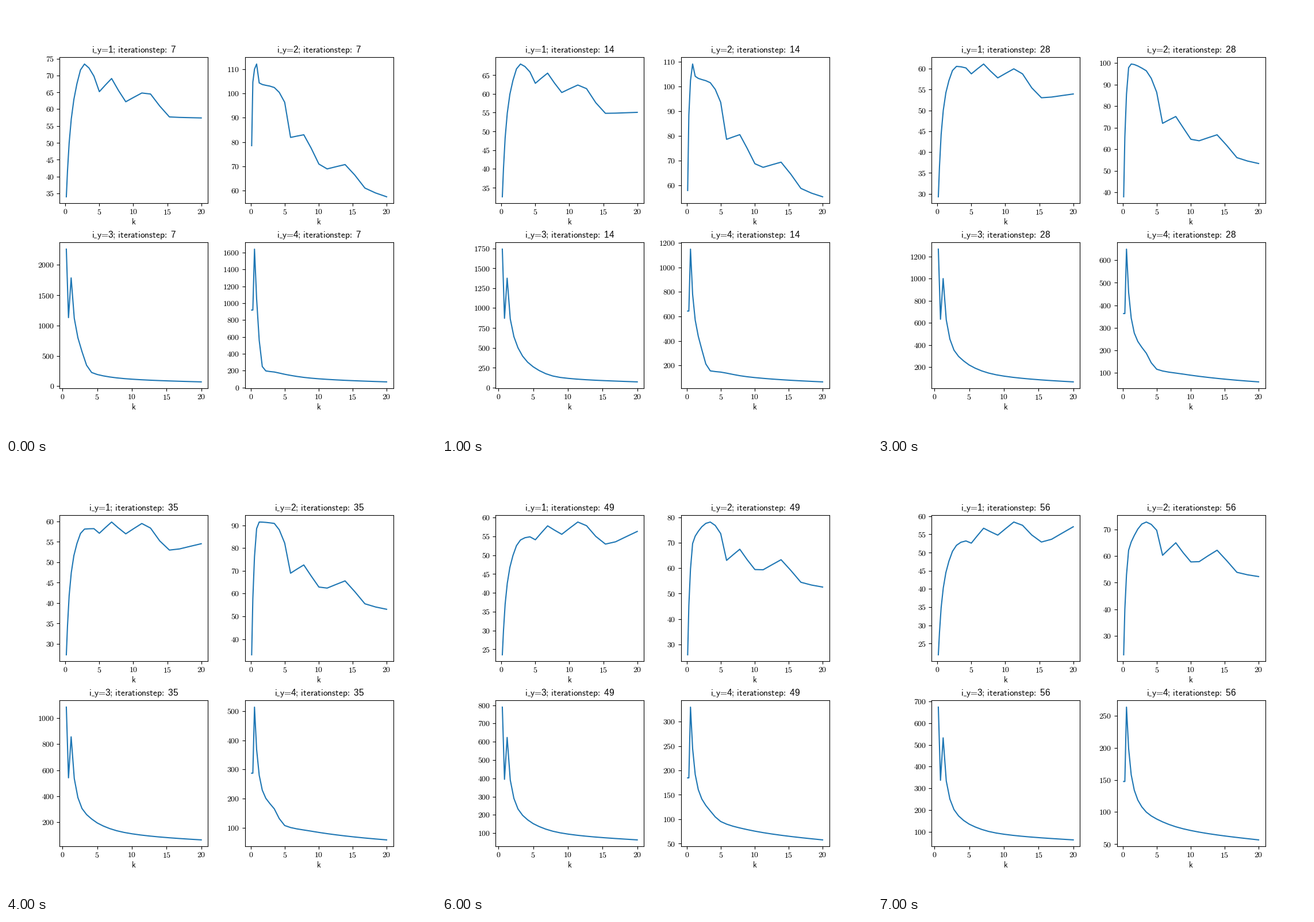
A matplotlib script that plays this animation: 748 px wide and 748 px high, repeating every 8 s.

```python
import numpy as np
import matplotlib.pyplot as plt
from matplotlib.animation import FuncAnimation
from matplotlib.lines import Line2D
from matplotlib.ticker import StrMethodFormatter
from matplotlib.transforms import IdentityTransform

plt.rcParams.update({"mathtext.fontset": "cm", "font.family": "Liberation Serif"})

SIZE, DPI = 748, 100
LEFTS, TOPS = (93.2, 415.6), (89.4, 411.4)
WIDTH, HEIGHT = 258.2, 254
TITLE_PT = 11.2
EM = TITLE_PT * DPI / 72
STEP, FRAMES = 7, 8
LAST = 24   # last index of the quadratic k grid

# Each curve: knots on the grid index, heights of the opening spike relative
# to its peak, and for a few iteration steps the peak and the later knots.
CURVES = [
    ((2, 4, 6, 9, 11, 12, 14, 16, 18, 19, 21, 24), (1,), {
        7: (34, 50, 62.9, 73.4, 69.8, 65.2, 69.1, 62.2, 64.8, 64.5, 57.7, 57.4),
        21: (31.1, 46.5, 57, 63.5, 62.5, 60.6, 62.7, 58.8, 60.6, 59.3, 53.1, 53.7),
        56: (21.9, 34.9, 44.5, 52, 53.2, 52.6, 56.7, 54.8, 58.4, 57.5, 52.9, 57.1)}),
    ((2, 3, 5, 6, 10, 12, 13, 15, 17, 18, 20, 22, 24), (1,), {
        7: (78.5, 104.7, 112.2, 104.4, 102.5, 96.4, 81.9, 83, 70.9, 68.9, 70.7, 61, 57.4),
        21: (44.8, 75.3, 105, 103.5, 100, 90.4, 75.3, 77.9, 66.6, 65.6, 68, 57, 53.9),
        56: (22.9, 40, 62.2, 65.3, 72.8, 69.7, 60.3, 65, 57.8, 57.9, 62.2, 53.9, 52.3)}),
    ((4, 5, 6, 7, 9, 11, 12, 16, 24), (1, 0.5, 0.79, 0.495), {
        7: (2260, 570, 225, 192, 124, 70),
        14: (1742, 500, 319, 261, 127, 71),
        21: (1485, 414, 289, 243, 135, 69),
        56: (674, 202, 152, 135, 94, 62.4)}),
    ((2, 3, 4, 5, 6, 7, 8, 10, 12, 16, 24), (0.56, 0.56, 1), {
        7: (1640, 1051, 560, 249, 197, 184, 157, 111, 67),
        14: (1150, 781, 570, 438, 329, 155, 145, 107, 65),
        21: (837, 580, 429, 340, 283, 197, 127, 101, 62),
        56: (263.4, 199, 158, 134, 118.6, 99.8, 89, 73.8, 56.5)}),
]


def smooth(x, xs, ys):
    """Cubic through the points along the last axis, without overshoot."""
    xs, ys = np.array(xs, float), np.array(ys, float)
    h = np.diff(xs)
    slope = np.diff(ys) / h
    s0, s1 = slope[..., :-1], slope[..., 1:]
    inner = 2 * np.maximum(s0 * s1, 0) / (s0 + s1 + 1e-12)
    tan = np.concatenate([slope[..., :1], inner, slope[..., -1:]], axis=-1)
    j = np.clip(np.searchsorted(xs, x, "right") - 1, 0, len(xs) - 2)
    u = (x - xs[j]) / h[j]
    v = 1 - u
    return (ys[..., j] * (1 + 2 * u) * v**2 + ys[..., j + 1] * (3 - 2 * u) * u**2
            + h[j] * u * v * (tan[..., j] * v - tan[..., j + 1] * u))


def grid(knots):
    return np.arange(knots[0], LAST + 1)


def values(curve, step):
    knots, spike, keys = curve
    rows = [[row[0] * r for r in spike] + list(row[1:]) for row in keys.values()]
    now = smooth(step, list(keys), np.log(rows).T)
    return np.exp(smooth(grid(knots), knots, now))


def title_text(panel, step):
    digits = r"\mathregular{%d}\hspace{-0.06}"
    return (r"$\mathsf{i\hspace{0.41}y}\hspace{-0.2}=\hspace{-0.2}" + digits % panel
            + r"\mathsf{;\hspace{0.18}iterationstep\hspace{-0.2}:\hspace{0.306}}"
            + digits % step + "$")


fig = plt.figure(figsize=(SIZE / DPI, SIZE / DPI), dpi=DPI)

panels = []
for n, curve in enumerate(CURVES):
    left, top = LEFTS[n % 2], TOPS[n // 2]
    ax = fig.add_axes([left / SIZE, 1 - (top + HEIGHT) / SIZE,
                       WIDTH / SIZE, HEIGHT / SIZE])
    k = 20 * (grid(curve[0]) / LAST) ** 2
    line, = ax.plot(k, values(curve, STEP), color="#1f77b4", lw=1.5)
    ax.set_xlabel(r"$\mathsf{k}$", fontsize=10, labelpad=1.4)
    ax.tick_params(axis="x", pad=2.5)
    ax.tick_params(axis="y", pad=3)
    for axis in (ax.xaxis, ax.yaxis):
        axis.set_major_formatter(StrMethodFormatter(r"$\mathrm{{{x:.0f}}}$"))
    title = ax.set_title("", fontsize=TITLE_PT, fontfamily="Liberation Sans")
    underscore = Line2D([0, 0], [0, 0], color="black", lw=0.6,
                        transform=IdentityTransform())
    fig.add_artist(underscore)
    panels.append((ax, line, curve, title, underscore))


def update(frame):
    step = STEP * (frame + 1)
    for n, (ax, line, curve, title, underscore) in enumerate(panels, 1):
        line.set_ydata(values(curve, step))
        ax.relim()
        ax.autoscale_view()
        title.set_text(title_text(n, step))
        x = title.get_window_extent().x0 + 0.3 * EM
        y = ax.bbox.y1 + 6 * DPI / 72
        underscore.set_data([x, x + 0.25 * EM], [y, y])
    return []


anim = FuncAnimation(fig, update, frames=FRAMES, init_func=lambda: update(0),
                     interval=1000, repeat=True, repeat_delay=0)
plt.show()
```
